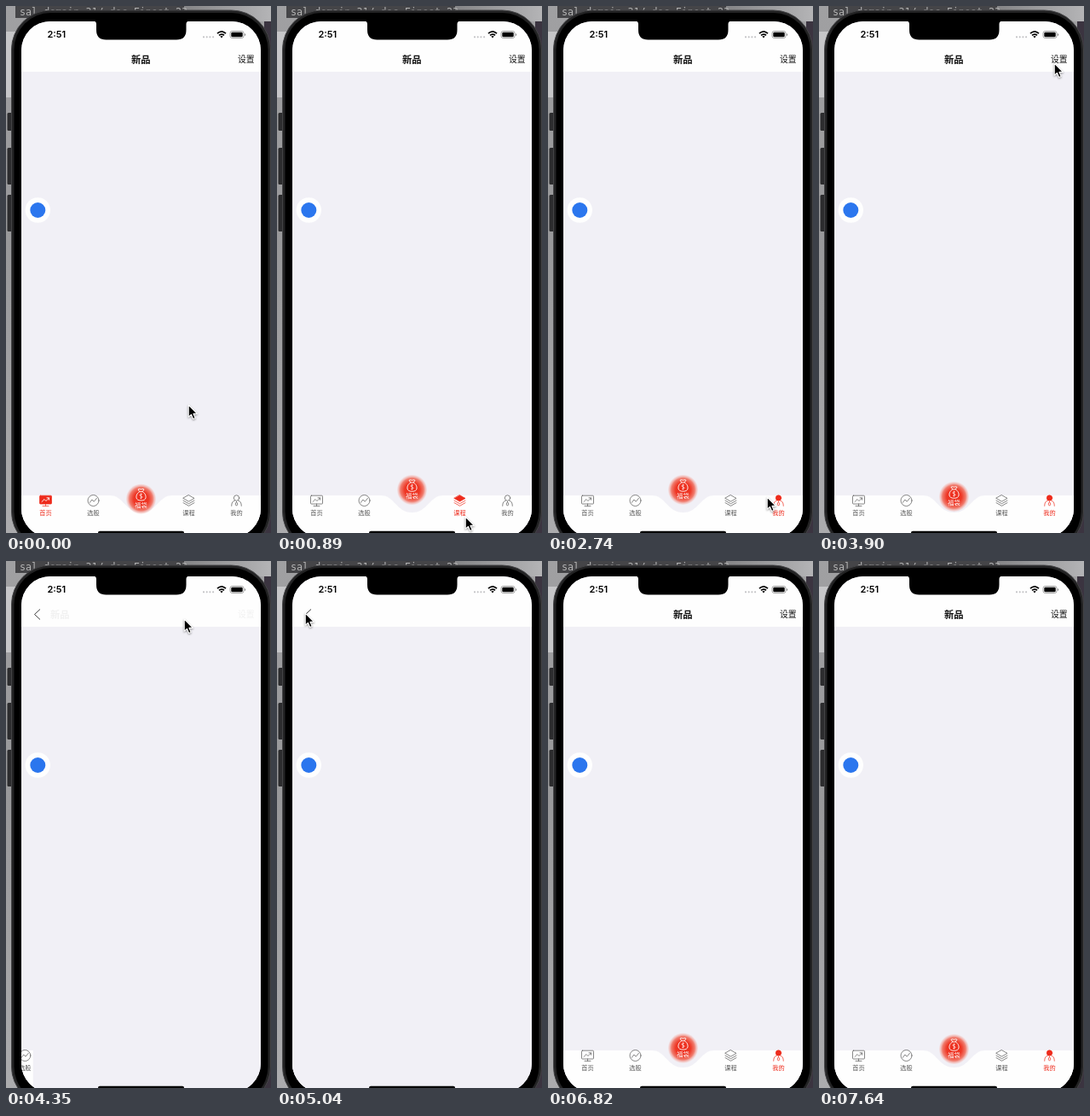
Write an HTML page that moves like this. It is 311 px wide and 617 px high and loops after 7740 ms.

```html
<!DOCTYPE html>
<html lang="zh-CN">
<head>
<meta charset="utf-8">
<title>App tabs</title>
<style>
  html, body { margin: 0; width: 100%; height: 100%; overflow: hidden; background: #a4a4a6; }
  svg { display: block; }
  text { font-family: "Noto Sans CJK SC", "Noto Sans CJK", sans-serif; stroke: none; }
  .mid { text-anchor: middle; }
  .tab { color: #555; fill: none; stroke: currentColor; stroke-width: .7; stroke-linejoin: round; stroke-linecap: round; }
  .tab text { fill: currentColor; font-size: 7.2px; font-weight: 500; text-anchor: middle; }
  .tab.on { color: #ee2b1c; }
  .on .solid { fill: currentColor; }
  .on .inner { stroke: #fff; stroke-width: .9; }
</style>
</head>
<body>
<svg width="311" height="617" viewBox="0 0 311 617">
  <defs>
    <clipPath id="screen"><rect x="18" y="18" width="281" height="604" rx="34"/></clipPath>
    <radialGradient id="glow">
      <stop offset="0" stop-color="#ee2a1a"/>
      <stop offset=".5" stop-color="#ee3826"/>
      <stop offset=".78" stop-color="#f07c6e"/>
      <stop offset="1" stop-color="#f4d0ce" stop-opacity=".4"/>
    </radialGradient>
    <linearGradient id="desk" x2="0" y2="1">
      <stop offset="0" stop-color="#a0a0a2"/>
      <stop offset=".45" stop-color="#98989a"/>
      <stop offset="1" stop-color="#acacae"/>
    </linearGradient>
    <linearGradient id="bar">
      <stop offset="0" stop-color="#858587"/>
      <stop offset="1" stop-color="#b4b4b6"/>
    </linearGradient>
  </defs>

  <!-- desktop behind the phone -->
  <rect width="311" height="617" fill="url(#desk)"/>
  <rect y="30" width="11" height="77" fill="#c6c6c8"/>
  <rect x="209" width="102" height="18" fill="url(#bar)"/>
  <rect x="11" width="198" height="14" fill="#454548"/>
  <rect x="303" y="18" width="8" height="599" fill="#3b3440"/>
  <text x="16" y="11" font-size="11.7" fill="#b4b4b4" style="font-family:'DejaVu Sans Mono',monospace">sal domain 31/ doc_Finest 23</text>

  <!-- phone body -->
  <g fill="#2c2c2e">
    <rect x="1.5" y="125" width="6" height="21" rx="1.5"/>
    <rect x="1.5" y="166" width="6" height="43" rx="1.5"/>
    <rect x="1.5" y="221" width="6" height="43" rx="1.5"/>
  </g>
  <rect x="6.5" y="5" width="304" height="633" rx="46" fill="#232324" stroke="#444446"/>
  <rect x="9.5" y="8" width="298" height="627" rx="43"/>

  <g clip-path="url(#screen)">
    <rect x="18" y="17" width="281" height="606" fill="#f1f0f6"/>

    <g id="home">
      <rect x="18" y="77" width="281" height="546" fill="#f1f0f6"/>
      <path d="M18 573H122C138 573 140 593 158.500 593S179 573 195 573H299V623H18Z" fill="#fefefe"/>
      <g class="tab" transform="translate(46.500 579)">
        <rect class="solid" x="-7" y="-5.800" width="14" height="9.800" rx="1"/>
        <path class="inner" d="M-4.500 1.500L-1.500-1.500L.5.500L4-3M1.500-3.200H4V-.8"/>
        <path d="M0 4V6.300M-3.500 6.400H3.500"/>
        <text y="16.500">首页</text>
      </g>
      <g class="tab" transform="translate(102.500 579)">
        <circle class="solid" r="6.500"/>
        <path class="inner" d="M-4.300 2.500L-1.600-1L.8 1.200L4-2.800"/>
        <text y="16.500">选股</text>
      </g>
      <g class="tab" transform="translate(214.500 579)">
        <path class="solid" d="M0-6.300L6.500-2.600L0 1.100L-6.500-2.600Z"/>
        <path d="M-6.500 0L0 3.700L6.500 0M-6.500 2.600L0 6.300L6.500 2.600"/>
        <text y="17">课程</text>
      </g>
      <g class="tab" transform="translate(270.500 579)">
        <circle class="solid" cy="-3" r="3.200"/>
        <path d="M-5.800 6.300C-5.800 2.500-4.500.8-2.200 0M5.800 6.300C5.800 2.500 4.500.8 2.200 0M0 1.500C-2 4.200-1.300 5.800 0 5.800S2 4.200 0 1.500"/>
        <text y="17">我的</text>
      </g>
      <g id="bag">
        <circle r="17.500" fill="url(#glow)"/>
        <g fill="none" stroke="#fff" stroke-width=".9" stroke-linejoin="round">
          <path d="M-1.700-8.500L-3.500-11.200Q-1.700-12.200 0-11.200Q1.700-12.200 3.500-11.200L1.700-8.500ZM-1.700-8.500C-5-6.500-5.700-4-5.500-1.500Q-5 1.800 0 1.800T5.500-1.500C5.700-4 5-6.500 1.700-8.500"/>
          <path d="M1.500-5.300Q0-6.500-1.300-5.200T0-3.300T1.300-1.400T-1.500-1.300M0-6.500V0" stroke-width=".6"/>
        </g>
        <text class="mid" y="9.700" font-size="7.200" fill="#fff">福袋</text>
      </g>
    </g>

    <g id="detail">
      <rect x="18" y="77" width="281" height="546" fill="#f1f0f6"/>
    </g>

    <rect x="18" y="17" width="281" height="60" fill="#fefefe"/>
    <g id="homeNav" fill="#111">
      <text id="title" class="mid" x="158.300" y="67" font-size="11.300" font-weight="700">新品</text>
      <text x="272" y="66.300" font-size="9.800" font-weight="500">设置</text>
    </g>
    <path id="back" d="M40 56.500L33.500 62.500L40 68.500" fill="none" stroke="#333"/>

    <!-- status bar -->
    <text x="48.500" y="37.300" font-size="11" font-weight="600" style="font-family:Inter,sans-serif">2:51</text>
    <path d="M232 36.300H244" stroke="#c3c3c6" stroke-width="2.200" stroke-linecap="round" stroke-dasharray="0 3.700"/>
    <g fill="none" stroke="#000" stroke-width="1.700">
      <path d="M248 32.200Q253 27.700 258 32.200M250 34.400Q253 31.700 256 34.400"/>
    </g>
    <path d="M251.300 35.600Q253 34.400 254.700 35.600L253 37.400Z"/>
    <rect x="263" y="29.500" width="16" height="8" rx="2.300" fill="none" stroke="#8d8d8d" stroke-width=".8"/>
    <rect x="264.300" y="30.800" width="13.400" height="5.400" rx="1.200"/>
    <path d="M280 32V35Q281.200 34.500 281.200 33.500T280 32" fill="#8d8d8d"/>
    <path d="M102 17Q106 18 106 21V28Q106 39.500 117.500 39.500H200Q211.500 39.500 211.500 28V21Q211.500 18 215.500 17Z"/>

    <!-- floating button -->
    <circle cx="37.300" cy="239" r="14.700" fill="#fefefe"/>
    <circle cx="37.300" cy="239" r="9" fill="#2b76ee"/>
    <rect x="108" y="614.800" width="101" height="4" rx="2"/>
  </g>

  <path id="cursor" d="M-.8-.8V13.200L2.400 10.300L4.600 15.500L7.100 14.400L4.900 9.400H9.400Z" stroke="#fff" stroke-width="1.100" stroke-linejoin="round"
    style="filter:drop-shadow(0 1px 1px #0006)"/>
</svg>
<script>
  const LOOP = 7740, WIDTH = 281;
  const $ = id => document.getElementById(id);
  const tabs = [...document.querySelectorAll('.tab')];

  const holds = [[0, 60], [690, 830], [4350, 4530], [4610, 4790], [5040, 5310], [5520, 5830], [7410, 7640], [7640, 7740]];

  // Pointer path: time, x, y.
  const path = [
    [60, 215, 468], [350, 241, 530], [690, 222, 599], [1000, 222, 599], [1500, 273, 581], [2200, 273, 581],
    [2500, 264, 588], [2740, 258, 576], [3220, 270, 89], [3550, 276, 60], [3850, 277, 68], [4150, 277, 68],
    [4350, 210, 69], [4610, 90, 63], [4790, 60, 60], [5000, 34, 62], [5800, 34, 62], [6080, 219, 572],
    [6160, 219, 572], [6500, 286, 622]
  ];

  const clamp = v => Math.min(1, Math.max(0, v));
  const smooth = v => v * v * (3 - 2 * v);
  const easeOut = (t, start, length) => 1 - (1 - clamp((t - start) / length)) ** 4;
  const move = (id, x, y) => $(id).setAttribute('transform', `translate(${x} ${y})`);

  function pointer(t) {
    const i = path.findIndex(p => p[0] > t);
    if (i === 0) return path[0].slice(1);
    if (i < 0) return path.at(-1).slice(1);
    const [t0, x0, y0] = path[i - 1], [t1, x1, y1] = path[i];
    const k = smooth((t - t0) / (t1 - t0));
    return [x0 + (x1 - x0) * k, y0 + (y1 - y0) * k];
  }

  function render(time) {
    const hold = holds.find(([a, b]) => time >= a && time < b);
    const t = hold ? hold[0] : time;

    const selected = t < 830 ? 0 : t < 1950 ? 2 : 3;
    tabs.forEach((tab, i) => tab.classList.toggle('on', i === selected));

    // The bobbing restarts when the home page comes back.
    const lowest = t < 5200 ? 1700 : 6270;
    move('bag', 158.5, 572 + 6 * Math.cos((t - lowest) / 1860 * 2 * Math.PI));

    const pushed = easeOut(t, 4080, 510) - easeOut(t, 5250, 400);
    move('home', -WIDTH * .3 * pushed, 0);
    move('detail', WIDTH * (1 - pushed), 0);
    move('title', -100 * pushed, 0);
    $('homeNav').style.opacity = 1 - pushed;
    $('back').style.opacity = pushed;

    move('cursor', ...pointer(t));
  }

  function frame() {
    render(performance.now() % LOOP);
    requestAnimationFrame(frame);
  }
  frame();
</script>
</body>
</html>
```
